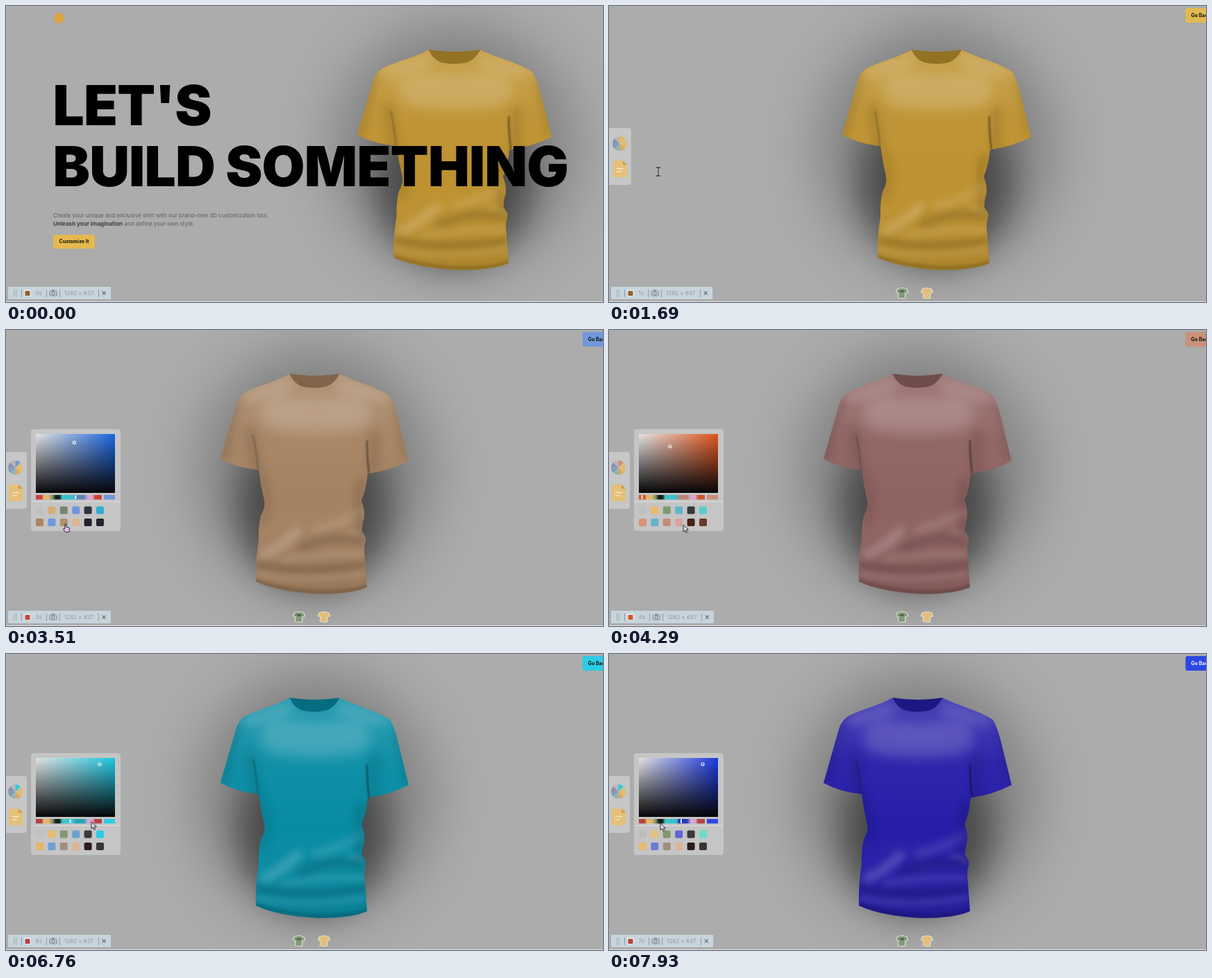
Animation, 860 px wide and 427 px high, one loop 8000 ms. Source, as an HTML page with a canvas:

```html
<!DOCTYPE html>
<html lang="en">
<head>
<meta charset="utf-8">
<title>Shirt customizer</title>
<style>
  html, body { margin: 0; width: 100%; height: 100%; overflow: hidden; background: #abacab; }
  #stage { position: absolute; left: 0; top: 0; width: 860px; height: 427px; overflow: hidden; }
  canvas { position: absolute; left: 0; top: 0; }
  #home { position: absolute; inset: 0; font-family: Inter, sans-serif; font-optical-sizing: none; white-space: nowrap; }
  #home > * { position: absolute; margin: 0; }
  h1 { left: 67.5px; top: 99px; font-size: 80px; line-height: 88px; font-weight: 900; letter-spacing: -.01em; color: #000; }
  p { left: 68px; top: 296px; font-size: 8.05px; line-height: 12px; color: #5d5f61; }
  p b { color: #3e4042; }
  #go { left: 68px; top: 330px; width: 60px; height: 20px; border-radius: 3px; background: #e6b850;
        font-size: 7.05px; line-height: 20px; font-weight: 700; text-align: center; color: #16120a; }
  #logo { left: 69px; top: 10px; width: 15px; height: 15px; border-radius: 50%; background: #d9a441; }
</style>
</head>
<body>
<div id="stage">
  <canvas id="scene" width="860" height="427"></canvas>
  <div id="home">
    <div id="logo"></div>
    <h1>LET'S<br>BUILD SOMETHING</h1>
    <p>Create your unique and exclusive shirt with our brand-new 3D customization tool.<br><b>Unleash your imagination</b> and define your own style.</p>
    <div id="go">Customize It</div>
  </div>
  <canvas id="overlay" width="860" height="427"></canvas>
</div>
<script>
const W = 860, H = 427, LOOP = 8000, STEP = 130;
const LEAVE = 1253, PICKER = 2210, DRAG = 6870;
const home = document.getElementById('home');
const scene = document.getElementById('scene').getContext('2d');
const top2d = document.getElementById('overlay').getContext('2d');

const clamp = (v, a = 0, b = 1) => Math.min(b, Math.max(a, v));
const lerp = (a, b, u) => a + (b - a) * u;
const rgb = c => `rgb(${c.map(Math.round).join()})`;

// Interpolates rows of [time, ...values]
function keyed(rows, t) {
  let i = 0;
  while (i < rows.length - 2 && t >= rows[i + 1][0]) i++;
  const a = rows[i], b = rows[i + 1], u = clamp((t - a[0]) / (b[0] - a[0]));
  const e = u * u * (3 - 2 * u);
  return a.slice(1, 4).map((v, k) => typeof v === 'number' ? lerp(v, b[k + 1], e) : v);
}
const latest = (rows, t) => rows.filter(r => r.at <= t).pop();

function hsv(h, s, v) {
  const f = n => { const k = (n + h / 60) % 6; return 255 * (v - v * s * clamp(Math.min(k, 4 - k))); };
  return [f(5), f(3), f(1)];
}
function toHsv([r, g, b]) {
  const max = Math.max(r, g, b), d = max - Math.min(r, g, b) || 1;
  const h = max === r ? (g - b) / d : max === g ? 2 + (b - r) / d : 4 + (r - g) / d;
  return [(h * 60 + 360) % 360, d / max, max / 255];
}
const hex = s => [1, 3, 5].map(i => parseInt(s.slice(i, i + 2), 16));

const swatches = ['#bec1c1', '#e8bb6c', '#83986f', '#68a2d2', '#373a38', '#35cbdc',
                  '#e2a05f', '#6d9fd2', '#a08d7e', '#dcb497', '#2c1c1c', '#3a3432'];
const states = [
  { at: 0, accent: '#e2ba52', rec: '#96602a', swap: {} },
  { at: 3250, accent: '#7098da', rec: '#cd413c', swap: { 1: '#d3ae74', 2: '#77856f', 3: '#6f98dc', 4: '#2c3340', 5: '#2eaed6', 6: '#ab8465', 7: '#6f98dc', 8: '#b3916f', 10: '#231f2b', 11: '#23262d' } },
  { at: 4030, accent: '#c9917a', rec: '#d2542c', swap: { 3: '#63b4ca', 5: '#58d0cb', 6: '#dc9270', 7: '#63b4ca', 8: '#c48c76', 9: '#d8a49c', 10: '#4a2013', 11: '#6a3829' } },
  { at: 4850, accent: '#ff96ad', rec: '#d2542c', swap: { 9: '#f29cab', 10: '#4a2013' } },
  { at: 5460, accent: '#2ccce4', rec: '#ee6a2c', swap: { 1: '#ecb05c', 5: '#1fcfe6', 6: '#ee9c45' } },
  { at: 6500, accent: '#2ccce4', rec: '#b24448', swap: { 5: '#2ccce4', 6: '#e6b565' } },
  { at: 7300, accent: '#2ccce4', rec: '#b54340', swap: { 0: '#babcbc', 1: '#e6c27a', 3: '#5f67d6', 5: '#68dccb', 6: '#e8ba70', 7: '#6d7bd6' } }
];
const hues = [[DRAG, 315], [7540, 231]];

const shirtTones = [
  [0, 190, 146, 48], [3250, 190, 146, 48], [3510, 165, 130, 97], [3900, 82, 112, 163],
  [4030, 82, 112, 163], [4290, 143, 99, 97], [4680, 152, 112, 88], [4850, 152, 112, 88],
  [5250, 200, 115, 130], [5460, 200, 115, 130], [5720, 121, 113, 112], [6150, 8, 140, 164],
  [DRAG, 8, 140, 164], [7300, 100, 42, 168], [7800, 38, 30, 168]
];
const pointer = [
  [520, 128, 440, 'arrow'], [980, 99, 341, 'hand'], [1300, 97, 338, 'ibeam'], [1690, 71, 239, 'ibeam'],
  [2080, 16, 200, 'hand'], [2470, 18, 202, 'hand'], [3100, 66, 278, 'hand'], [3280, 66, 278, 'hand'],
  [3510, 85, 280, 'hand'], [4030, 85, 280, 'hand'], [4290, 107, 281, 'arrow'], [4850, 101, 277, 'hand'],
  [5000, 103, 275, 'hand'], [5420, 135, 259, 'hand'], [5720, 121, 255, 'arrow'], [6300, 124, 246, 'arrow'],
  [6760, 123, 242, 'arrow'], [7540, 104, 242, 'arrow'], [7930, 74, 244, 'arrow']
];

const body = new Path2D(`M409 63 Q445 69 480 63 C503 75 535 82 553 95 Q560 106 566 132 L580 189
  Q552 203 523 207 L521 207 Q519 230 512 246 Q517 258 516 270 Q512 284 513 291 Q520 299 518 305 Q515 312 517 330
  L520 371 Q500 381 450 381 Q392 378 360 363 Q359 335 364 303 Q363 285 367 268 Q374 255 372 246
  Q367 225 364 202 Q333 199 309 186 L331 109 Q335 95 346 89 C366 79 390 74 409 63Z`);
const neck = new Path2D('M409 63 Q445 69 480 63 C473 78 463 83 444 83 C425 83 415 78 409 63Z');

function buffer(paint) {
  const c = document.createElement('canvas');
  c.width = W; c.height = H;
  paint(c.getContext('2d'));
  return c;
}

const shadow = buffer(g => {
  const cast = (blur, alpha, x, y, rx, ry) => {
    g.filter = `blur(${blur}px)`;
    g.fillStyle = `rgba(0,0,0,${alpha})`;
    g.beginPath();
    g.ellipse(x, y, rx, ry, 0, 0, 7);
    g.fill();
  };
  cast(42, .27, 445, 205, 165, 175);
  cast(24, .42, 443, 255, 108, 118);
});

const shading = buffer(g => {
  g.clip(body);
  const dark = a => `rgba(0,0,0,${a})`, pale = a => `rgba(255,255,255,${a})`;
  const light = g.createLinearGradient(0, 62, 0, 381);
  [[0, pale(.14)], [.12, pale(.12)], [.3, pale(.04)], [.6, pale(0)], [1, dark(.1)]]
    .forEach(s => light.addColorStop(...s));
  g.fillStyle = light;
  g.fillRect(0, 0, W, H);
  const fold = (color, width, blur, path) => {
    g.filter = `blur(${blur}px)`;
    g.strokeStyle = color;
    g.lineWidth = width;
    g.lineCap = 'round';
    g.stroke(new Path2D(path));
  };
  fold(pale(.17), 50, 9, 'M392 120 Q445 130 500 120');
  fold(pale(.14), 18, 7, 'M352 96 Q385 82 405 80');
  fold(pale(.14), 18, 7, 'M540 96 Q505 82 485 80');
  fold(dark(.12), 14, 7, 'M352 145 Q356 170 362 204');
  fold(dark(.12), 14, 7, 'M532 150 Q528 180 530 204');
  fold(dark(.12), 12, 6, 'M333 105 L312 185');
  fold(dark(.1), 12, 6, 'M562 110 L576 180');
  fold(dark(.1), 14, 7, 'M370 215 Q378 245 370 275');
  fold(dark(.13), 14, 6, 'M512 220 Q505 255 512 295');
  fold(pale(.18), 14, 6, 'M372 324 Q398 312 420 290');
  fold(pale(.12), 12, 6, 'M445 288 Q482 280 510 262');
  fold(dark(.17), 12, 6, 'M425 314 Q470 294 514 304');
  fold(pale(.12), 8, 4, 'M495 292 Q508 292 514 300');
  fold(pale(.09), 10, 5, 'M400 332 Q450 320 512 324');
  fold(dark(.16), 9, 4, 'M364 338 Q430 352 516 338');
  fold(pale(.1), 8, 4, 'M364 352 Q430 366 514 352');
  fold(dark(.2), 5, 2, 'M361 362 Q400 376 450 378 Q500 379 520 369');
  fold(dark(.5), 2, 1, 'M520 160 Q520 185 523 206');
  fold(dark(.3), 1.5, 1, 'M356 152 Q361 175 363 201');
  g.filter = 'none';
  g.globalCompositeOperation = 'destination-out';
  g.fillStyle = '#000';
  g.fill(neck);
  g.globalCompositeOperation = 'source-over';
  g.fillStyle = dark(.22);
  g.fill(neck);
  g.strokeStyle = dark(.14);
  g.lineWidth = 1;
  g.stroke(neck);
});

function box(g, x, y, w, h, r, fill) {
  g.fillStyle = fill;
  g.beginPath();
  g.roundRect(x, y, w, h, r);
  g.fill();
}
function label(g, text, x, y, font, color) {
  g.font = font + ' Inter, sans-serif';
  g.fillStyle = color;
  g.textBaseline = 'alphabetic';
  g.fillText(text, x, y);
}
function line(g, color, width, ...pts) {
  g.strokeStyle = color;
  g.lineWidth = width;
  g.beginPath();
  for (let i = 0; i < pts.length; i += 2) g.lineTo(pts[i], pts[i + 1]);
  g.stroke();
}

function drawShirt(g, t) {
  const s = Math.max(0, t - LEAVE) / 125;
  const away = (1 + s) * Math.exp(-s);
  g.save();
  g.translate(445 + 201.5 * away, 0);
  g.scale(1 + .035 * away, 1);
  g.translate(-445, 0);
  g.drawImage(shadow, 0, 0);
  g.fillStyle = rgb(keyed(shirtTones, t));
  g.fill(body);
  g.drawImage(shading, 0, 0);
  g.restore();
}

function drawTabs(g, x, st) {
  box(g, x - 6, 176, 36, 82, 4, 'rgba(225,225,225,.5)');
  const cx = x + 13.5, cy = 198.5;
  const wheel = ['#dcbd7c', '#e4ba6c', '#d8a868', '#8fb4b4', '#7d9fb8', '#8790b0', '#bdb3b8', st.accent];
  wheel.forEach((c, i) => {
    g.fillStyle = c;
    g.beginPath();
    g.moveTo(cx, cy);
    g.arc(cx, cy, 10.5, i * Math.PI / 4 - Math.PI / 4, (i + 1) * Math.PI / 4 - Math.PI / 4);
    g.fill();
  });
  g.fillStyle = '#e4c078';
  g.fill(new Path2D(`M${x + 6} 223h12l6 6v16q0 2-2 2h-16q-2 0-2-2v-20q0-2 2-2Z`));
  g.fillStyle = '#cf9c4a';
  g.fill(new Path2D(`M${x + 18} 223l6 6h-6Z`));
  line(g, '#f3e6c8', 1.5, x + 9, 234.5, x + 19, 234.5);
  line(g, '#f3e6c8', 1.5, x + 9, 239, x + 16, 239);
}

function drawPicker(g, st, accent) {
  const [h, s, v] = toHsv(accent);
  box(g, 36, 143, 129, 147, 4, 'rgba(218,218,218,.55)');
  const across = g.createLinearGradient(43, 0, 157, 0);
  across.addColorStop(0, '#e4e4e4');
  across.addColorStop(1, rgb(hsv(h, .88, .88)));
  g.fillStyle = across;
  g.fillRect(43, 150, 114, 85);
  const down = g.createLinearGradient(0, 150, 0, 235);
  down.addColorStop(0, 'rgba(6,6,8,0)');
  down.addColorStop(1, 'rgba(6,6,8,1)');
  g.fillStyle = down;
  g.fillRect(43, 150, 114, 85);
  g.strokeStyle = '#f4f4f4';
  g.lineWidth = 1.2;
  g.beginPath();
  g.arc(43 + s * 114, 150 + (1 - v) * 85, 2, 0, 7);
  g.stroke();

  const bar = g.createLinearGradient(43, 0, 138, 0);
  const deep = rgb(hsv(h, s, .72));
  [[0, st.rec], [.09, st.rec], [.12, '#e3b96c'], [.2, '#dcb668'], [.26, '#6f8c66'], [.3, '#16201d'], [.36, '#16201d'],
   [.4, '#3cc6c6'], [.57, '#38bfd0'], [.61, deep], [.73, deep], [.79, '#d6a6d8'], [.86, '#dba3cb'],
   [.9, st.rec], [1, st.rec]].forEach(c => bar.addColorStop(...c));
  g.fillStyle = bar;
  g.fillRect(43, 238, 95, 6.5);
  g.fillStyle = '#f2f2f2';
  g.fillRect(42 + h / 360 * 95, 238.5, 2, 5.5);
  g.fillStyle = rgb(accent);
  g.fillRect(141, 238, 16, 6.5);
  line(g, '#dedede', 1, 36, 247.5, 165, 247.5);
  swatches.forEach((c, i) =>
    box(g, 43 + i % 6 * 17.4, i < 6 ? 254.5 : 272, 11, 11, 2, st.swap[i] || c));
}

function drawFilters(g, dy) {
  [[422, '#819a78'], [458, '#e5bd78']].forEach(([x, color], i) => {
    g.save();
    g.translate(x, 414 + dy);
    g.scale(.058, .044);
    g.translate(-445, -222);
    g.lineJoin = 'round';
    g.lineWidth = 46;
    g.strokeStyle = '#dcdcd8';
    g.stroke(body);
    g.fillStyle = color;
    g.fill(body);
    g.restore();
    if (!i) box(g, x - 3, 410 + dy, 6, 2.5, 0, '#4d6048');
  });
}

function drawCustomizer(g, t) {
  const s = (t - LEAVE - 20) / 1000;
  if (s < 0) return;
  const swing = Math.exp(-7 * s) * Math.cos(10 * s);
  const st = latest(states, t);
  const accent = t >= DRAG ? hsv(keyed(hues, t)[0], .807, .894) : hex(st.accent);
  g.globalAlpha = clamp(s / .25);
  drawTabs(g, -67 * swing, st);
  drawFilters(g, 50 * Math.exp(-12 * s));
  box(g, 830.5, 3, 44, 21, 3, rgb(accent));
  const [r, gr, b] = accent;
  label(g, 'Go Back', 838.5, 16.2, '700 7px', r * .3 + gr * .59 + b * .11 < 125 ? '#f3f3f8' : '#16140f');
  g.globalAlpha = 1;
  if (t >= PICKER) drawPicker(g, st, accent);
}

function drawRecorder(g, t) {
  const ink = '#8c99a3', rec = latest(states, t).rec;
  const count = Math.floor(t / 1000) + 's';
  g.font = '8px Inter, sans-serif';
  const dx = g.measureText(count).width - g.measureText('0s').width;
  box(g, 3, 405, 148 + dx, 18, 1, '#c8d4dc');
  g.fillStyle = '#7d8992';
  for (let i = 0; i < 8; i++) g.fillRect(11 + i % 2 * 3, 409.5 + (i >> 1) * 2.7, 1.2, 1.2);
  const rule = x => line(g, ink, 1, x, 409, x, 420);
  rule(22.5);
  box(g, 26, 409, 10, 10, 2, '#e3e8ea');
  box(g, 27.5, 411, 7, 7, 1, rec);
  label(g, count, 42.5, 417, '8px', ink);
  g.save();
  g.translate(dx, 0);
  rule(58.5);
  g.strokeStyle = '#7d8b96';
  g.lineWidth = 1.2;
  g.beginPath();
  g.roundRect(63, 411, 10, 7, 1.5);
  g.moveTo(70.2, 414.5);
  g.arc(68, 414.5, 2.2, 0, 7);
  g.stroke();
  box(g, 66, 409.3, 4, 2, 1, '#7d8b96');
  rule(77.5);
  label(g, '1282 × 637', 84, 417, '8px', ink);
  rule(133.5);
  line(g, '#5c6a75', 1.2, 138.7, 411.7, 143.6, 416.6);
  line(g, '#5c6a75', 1.2, 143.6, 411.7, 138.7, 416.6);
  g.restore();
}

const shapes = {
  arrow: new Path2D('M0 0V10L2.4 8L4 11.6L5.8 10.8L4.2 7.3L7.4 7.2Z'),
  hand: new Path2D('M0 0Q1.6 -1 1.8 1V4.3L5.6 5Q7 5.4 6.6 7.6L5.6 11.5H.4L-2.6 7.4Q-2.4 5.6-.4 7Z')
};
function drawPointer(g, t) {
  if (t < pointer[0][0]) return;
  const [x, y] = keyed(pointer, t), kind = pointer.filter(p => p[0] <= t).pop()[3];
  g.save();
  g.translate(x, y);
  if (kind === 'ibeam') {
    line(g, '#d8d8d8', 2.4, 0, -5, 0, 5);
    line(g, '#222', 1.2, 0, -6, 0, 6);
    line(g, '#222', 1.2, -3, -6, 3, -6);
    line(g, '#222', 1.2, -3, 6, 3, 6);
  } else {
    g.fillStyle = kind === 'hand' ? '#dcc3dc' : '#dedae4';
    g.strokeStyle = '#2c2a38';
    g.lineWidth = 1;
    g.fill(shapes[kind]);
    g.stroke(shapes[kind]);
  }
  g.restore();
}

function frame(now) {
  const t = Math.floor(now % LOOP / STEP) * STEP;
  scene.fillStyle = '#abacab';
  scene.fillRect(0, 0, W, H);
  drawShirt(scene, t);

  const out = clamp((t - LEAVE) / 350);
  home.style.opacity = 1 - out;
  home.style.transform = `translateX(${-67 * out * (2 - out)}px)`;

  top2d.clearRect(0, 0, W, H);
  drawCustomizer(top2d, t);
  drawRecorder(top2d, t);
  drawPointer(top2d, t);
  top2d.fillStyle = '#e6e6e6';
  top2d.fillRect(0, 426, W, 1);
  requestAnimationFrame(() => frame(performance.now() - start));
}
const start = performance.now();
frame(0);
</script>
</body>
</html>
```
